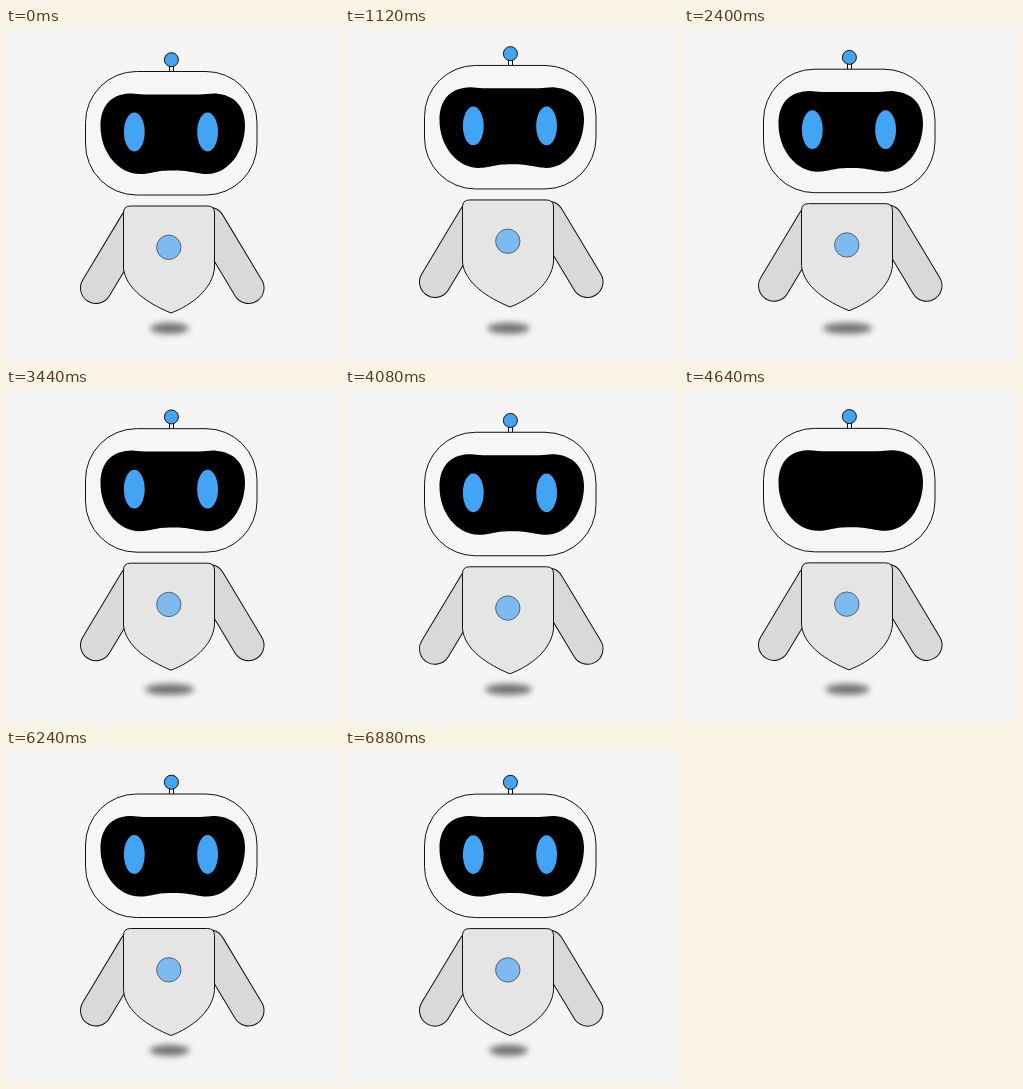
Animation of 333 by 333 pixels, one loop 6960 ms. Source, as an HTML page:

```html
<!DOCTYPE html>
<html lang="en">
<head>
<meta charset="utf-8">
<title>Floating robot</title>
<style>
  html, body { margin: 0; width: 100%; height: 100%; overflow: hidden; background: #f5f5f5; }
  svg { display: block; width: 100vw; height: 100vh; }
  .line { stroke: #111; stroke-width: 1; }
  .blue { fill: #43a4f6; }
</style>
</head>
<body>
<svg viewBox="0 0 333 333">
  <defs>
    <filter id="soft" x="-50%" y="-150%" width="200%" height="400%">
      <feGaussianBlur stdDeviation="3"/>
    </filter>
  </defs>
  <ellipse id="shadow" cx="163.5" cy="300.3" rx="20" ry="5.5" fill="#707070" filter="url(#soft)"/>
  <g id="robot">
    <g class="line" fill="#d9d9d9">
      <rect x="-15.5" y="-91.5" width="31" height="107" rx="15.5" transform="translate(90 260) rotate(31)"/>
      <rect x="-15.5" y="-91.5" width="31" height="107" rx="15.5" transform="translate(242.5 260) rotate(-31)"/>
    </g>
    <path class="line" fill="#e5e5e5" d="M124.5 178H201.5Q208.5 178 208.5 185V240C206.5 261 186 277 165 285C143 276 119.5 261 117.5 240V185Q117.5 178 124.5 178Z"/>
    <circle cx="162.8" cy="219.3" r="12.2" fill="#7dbaf0" stroke="#4d5a66" stroke-width=".9"/>
    <path class="line" fill="#f5f5f5" d="M163.5 37V44H167.5V37Z"/>
    <circle class="line blue" cx="165.4" cy="31.7" r="7"/>
    <rect class="line" x="79.5" y="43.5" width="171.5" height="123.5" rx="51" fill="#f6f6f6"/>
    <path d="M123 65.5C129 65 132 66.4 138 66.4H194C200 66.4 204 65 210 65.5C228 67 239 78 239 97C239 124 222 146 201 146C192 146 186 142.4 166 142.4C148 142.4 145 146 134 146C112 146 94.5 124 94.5 98C94.5 79 104 66.5 123 65.5Z"/>
    <ellipse class="eye blue" cx="128.3" cy="104" rx="10.4" ry="19.4"/>
    <ellipse class="eye blue" cx="201.6" cy="104" rx="10.4" ry="19.4"/>
  </g>
</svg>
<script>
  const LOOP = 6960, STEP = 80;

  // [time, value] pairs, eased in and out between neighbours
  const bob = [[0, 0], [1000, -6.2], [2080, -0.8], [2980, -6.2], [4040, -0.2], [5040, -6.2], [6040, 0.5], [6880, 0.6], [LOOP, 0]];
  const spread = [[0, 19.5], [2900, 25], [6000, 20], [LOOP, 19.5]];
  const open = [[0, 1], [4480, 1], [4640, 0], [4800, 1], [LOOP, 1]];

  const robot = document.getElementById('robot');
  const shadow = document.getElementById('shadow');
  const eyes = document.querySelectorAll('.eye');

  function sample(keys, t) {
    const i = keys.findIndex(k => k[0] > t);
    const [t0, a] = keys[i - 1], [t1, b] = keys[i];
    const p = (t - t0) / (t1 - t0);
    return a + (b - a) * (1 - Math.cos(Math.PI * p)) / 2;
  }

  function draw(now) {
    const t = Math.floor((now % LOOP) / STEP) * STEP;
    robot.setAttribute('transform', `translate(0 ${sample(bob, t).toFixed(2)})`);
    shadow.setAttribute('rx', sample(spread, t).toFixed(2));
    const ry = 19.4 * sample(open, t);
    eyes.forEach(eye => eye.setAttribute('ry', ry.toFixed(2)));
  }

  const start = performance.now();
  function tick() {
    draw(performance.now() - start);
    requestAnimationFrame(tick);
  }
  tick();
</script>
</body>
</html>
```
